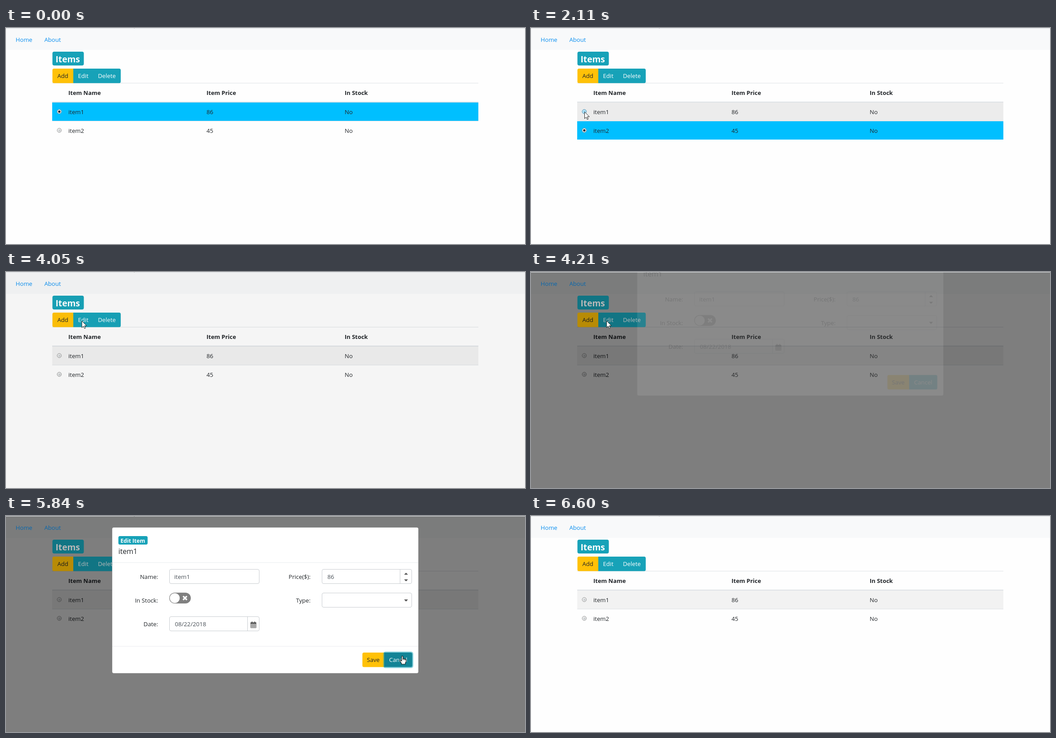
Write an HTML page that moves like this. It is 1157 px wide and 484 px high and loops after 7380 ms.

```html
<!DOCTYPE html>
<html lang="en">
<head>
<meta charset="utf-8">
<title>Items</title>
<style>
  html, body { margin: 0; width: 100%; height: 100%; overflow: hidden; background: #fefefe; }
  svg { display: block; font: 13.15px "Open Sans", "Noto Sans", sans-serif; fill: #212529; }
  .bold { font-weight: 700; }
</style>
</head>
<body>
<svg id="stage" width="1157" height="484" viewBox="0 0 1157 484"></svg>
<script>
const LOOP = 7380;
const TEAL = '#17a2b8', TEAL_HOVER = '#138496', AMBER = '#ffc107', LINE = '#dee2e6', BLUE = '#00bfff';
const stage = document.getElementById('stage');

function add(parent, tag, attrs, text) {
  const el = document.createElementNS('http://www.w3.org/2000/svg', tag);
  set(el, attrs);
  if (text) el.textContent = text;
  parent.append(el);
  return el;
}
function set(el, attrs) {
  for (const key in attrs) el.setAttribute(key, attrs[key]);
}
const group = parent => add(parent, 'g', {});
const rect = (parent, x, y, x2, y2, fill, more) =>
  add(parent, 'rect', { x, y, width: x2 - x, height: y2 - y, fill, ...more });
const label = (parent, x, y, text, more) => add(parent, 'text', { x, y, ...more }, text);
const path = (parent, d, fill, more) => add(parent, 'path', { d, fill, ...more });
const show = (el, on) => set(el, { visibility: on ? 'visible' : 'hidden' });

// A button with chosen round sides
function button(parent, x, y, x2, y2, fill, text, tx, color, left, right) {
  const l = left ? 3.5 : 0, r = right ? 3.5 : 0;
  const box = path(parent, `M${x + l} ${y}H${x2 - r}q${r} 0 ${r} ${r}V${y2 - r}q0 ${r} ${-r} ${r}` +
    `H${x + l}q${-l} 0 ${-l} ${-l}V${y + l}q0 ${-l} ${l} ${-l}z`, fill);
  label(parent, tx, y + 21.3, text, { fill: color });
  return box;
}
const ring = (parent, x, y, x2, y2) => rect(parent, x - 1, y - 1, x2 + 1, y2 + 1, 'none',
  { rx: 4, stroke: TEAL, 'stroke-width': 2.5, 'stroke-opacity': .5 });

// Page
const page = group(stage);
rect(page, 0, 0, 1157, 49, '#f8f9fa');
rect(page, 103, 123, 1053, 124, LINE);
['Item Name', 'Item Price', 'In Stock'].forEach((text, i) =>
  label(page, 139 + 308 * i, 149.7, text, { class: 'bold', 'font-size': 12.95 }));
rect(page, 103, 165, 1053, 167, LINE);

const rows = [['item1', '86', 'No'], ['item2', '45', 'No']].map((cells, i) => {
  const top = 167 + 42 * i, mid = 187.3 + 42 * i;
  const back = rect(page, 103, top, 1053, top + 41, '#fff');
  cells.forEach((text, c) => label(page, 139 + 308 * c, mid + 5.2, text));
  const radio = add(page, 'circle', { cx: 118.8, cy: mid, r: 4.7, 'stroke-width': 1 });
  const shade = add(page, 'circle', { cx: 119.2, cy: mid + .4, r: 2.7 });
  const dot = add(page, 'circle', { cx: 118.8, cy: mid, r: 2.6, fill: '#26343f' });
  return { back, radio, shade, dot, top, mid };
});
rect(page, 103, 208, 1053, 209, LINE);

const backdrop = rect(stage, 0, 0, 1157, 484, '#000');

// Coloured controls dim less than the page
const accents = group(stage);
label(accents, 21.5, 31, 'Home', { fill: '#0a8ff0' });
label(accents, 85.5, 31, 'About', { fill: '#0a8ff0' });
rect(accents, 103.5, 53, 173.5, 84, TEAL, { rx: 4 });
label(accents, 110.5, 76.7, 'Items', { class: 'bold', 'font-size': 19.2, fill: '#fff' });
button(accents, 103.5, 91, 150, 123.5, AMBER, 'Add', 114.5, '#212529', true, false);
const editBox = button(accents, 150, 91, 195, 123.5, TEAL, 'Edit', 160.5, '#fff', false, false);
button(accents, 195, 91, 255.8, 123.5, TEAL, 'Delete', 205, '#fff', false, true);
const editRing = ring(accents, 150, 91, 195, 123.5);

rect(stage, 0, 0, 1157, 1, '#dcdfe2');
rect(stage, 285, 0, 287, 1, '#b5b8bb');

// Dialog
const modal = group(stage);
rect(modal, 236.5, 25.5, 919.5, 352.5, '#fff', { rx: 4, stroke: '#000', 'stroke-opacity': .2 });
rect(modal, 250.5, 45, 315.7, 64, TEAL, { rx: 3.5 });
label(modal, 255.3, 59.6, 'Edit Item', { class: 'bold', 'font-size': 12.1, fill: '#fff' });
label(modal, 250.5, 85.3, 'item1', { 'font-size': 15.9 });
rect(modal, 237, 104, 919, 105, '#e9ecef');
rect(modal, 237, 291.5, 919, 292.5, '#e9ecef');

[['Name:', 339, 141], ['In Stock:', 339, 194], ['Date:', 339, 247], ['Price($):', 679, 141], ['Type:', 679, 194]]
  .forEach(([text, x, y]) => label(modal, x, y, text, { 'text-anchor': 'end' }));

const field = (x, y, text, tx) => {
  rect(modal, x + .5, y + .5, x + 200.5, y + 32.5, '#fff', { rx: 3.5, stroke: '#c8ccd0' });
  label(modal, tx, y + 22, text, { fill: '#495057' });
};
field(364, 119, 'item1', 375);
field(704, 119, '86', 716.5);
field(704, 172, '', 0);
field(364, 225, '08/22/2018', 376.5);
rect(modal, 878, 120, 879, 152, '#c8ccd0');
rect(modal, 538, 226, 539, 258, '#c8ccd0');
path(modal, 'M887.5 131.5h8.6l-4.3 -4.5zM887.5 142h8.6l-4.3 4.5zM887.5 187h8.6l-4.3 4.7z', '#555');

rect(modal, 364, 171.8, 412, 196, '#808080', { rx: 12.1 });
add(modal, 'circle', { cx: 376.2, cy: 183.9, r: 11, fill: '#fff' });
path(modal, 'M394.8 179.6l8.4 8.4m0 -8.4l-8.4 8.4', 'none', { stroke: '#fff', 'stroke-width': 3.4 });
path(modal, 'M545.5 239h12v11.5h-12zM545.5 242h12m-12 2.8h12m-12 2.8h12M548.5 242v8.5m3 -8.5v8.5m3 -8.5v8.5',
  'none', { stroke: '#555', 'stroke-width': .9 });
path(modal, 'M545 238.5h13v3h-13zM547.5 236.5h2v3h-2zM553.5 236.5h2v3h-2z', '#555');

button(modal, 794.5, 306, 843, 338.5, AMBER, 'Save', 804.5, '#212529', true, false);
const cancelBox = button(modal, 843, 306, 905.8, 338.5, TEAL, 'Cancel', 854, '#fff', false, true);
const cancelRing = ring(modal, 843, 306, 905.8, 338.5);

// Pointers, hot spot at 0,0
const arrow = path(stage, 'M0 0V15L3.5 11.8L6 17L8.2 16L5.8 10.9H10.7z', '#fff', { stroke: '#222', 'stroke-width': 1 });
const hand = group(stage);
path(hand, 'M-1.5 1.2Q0 -.8 1.5 1.2V6.3Q3 5.3 4 6.8Q5.4 6 6.3 7.6Q8.5 7 8.5 9.5V12.5L6.7 16V18.5H-2V16.3' +
  'L-5.8 10.5Q-5.5 8.5 -3.6 9.5L-1.5 11.4z', '#fff', { stroke: '#111', 'stroke-width': 1.1 });
path(hand, 'M1.5 6.3V9.5M4 6.8V9.5M6.3 7.6V10', 'none', { stroke: '#111', 'stroke-width': .9 });

// Pointer route: time, x, y
const route = [
  [150, 330, 461], [400, 235, 290], [600, 165, 145], [850, 124, 185], [1090, 119.5, 228],
  [1620, 119.5, 228], [2110, 119.5, 188], [2880, 119.5, 188], [3200, 148, 150], [3520, 171, 110.5],
  [3960, 171, 110.5], [4080, 168.5, 109.5], [4460, 168.5, 109.5], [4890, 237, 164.5],
  [5050, 560, 245], [5210, 868, 311], [5290, 883.5, 313.5], [6080, 883.5, 313.5],
  [6440, 962, 432], [6520, 992, 462], [6600, 1010, 484]
];
const clamp = v => Math.min(1, Math.max(0, v));

function pointer(t) {
  const i = route.findIndex(k => k[0] > t);
  if (i < 1) return route[i < 0 ? route.length - 1 : 0].slice(1);
  const [a, b] = [route[i - 1], route[i]], p = (t - a[0]) / (b[0] - a[0]);
  return [a[1] + (b[1] - a[1]) * p, a[2] + (b[2] - a[2]) * p];
}

// cubic-bezier(0, 0, .58, 1)
function easeOut(x) {
  let lo = 0, hi = 1;
  for (let i = 0; i < 20; i++) {
    const s = (lo + hi) / 2;
    if (1.74 * s * s * (1 - s) + s ** 3 < x) lo = s; else hi = s;
  }
  return 3 * lo * lo * (1 - lo) + lo ** 3;
}

const OPEN = 4040, SLIDE = 4197, CLOSE = 5885;

function draw(t) {
  const [x, y] = pointer(t);
  const visible = t >= 150 && t < 6590;
  const selected = t < 1250 ? 0 : t < 2960 ? 1 : t < OPEN ? 0 : -1;
  const checked = t < 1170 ? 0 : t < 2810 ? 1 : t < OPEN ? 0 : -1;

  rows.forEach((row, i) => {
    const over = visible && t < OPEN && y >= row.top && y < row.top + 41;
    const near = over && Math.hypot(x - 118.8, y - row.mid) < 6;
    set(row.back, { fill: i === selected ? BLUE : over ? '#ececec' : i ? '#fefefe' : '#f2f2f2' });
    set(row.radio, { fill: near ? '#c9ecfb' : '#f4f4f4', stroke: near ? '#3c86ae' : '#8e8f8f' });
    set(row.shade, { fill: near ? '#8fd0ee' : '#cfd2d4' });
    show(row.dot, i === checked);
  });

  const fade = Math.min(clamp((t - OPEN) / 150), 1 - clamp((t - CLOSE) / 150));
  set(backdrop, { opacity: fade / 2 });
  accents.style.filter = fade ? `brightness(${1 - .28 * fade})` : 'none';

  const alpha = Math.min(clamp((t - SLIDE) / 150), 1 - clamp((t - CLOSE) / 150));
  const shift = t < CLOSE ? 1 - easeOut(clamp((t - SLIDE) / 300)) : easeOut(clamp((t - CLOSE) / 300));
  set(modal, { opacity: alpha, transform: `translate(0 ${-81.5 * shift})` });

  const onEdit = t > 3200 && t < OPEN && x > 150 && y < 123;
  const onCancel = t > 5190 && t < 6080;
  set(editBox, { fill: onEdit ? TEAL_HOVER : TEAL });
  set(cancelBox, { fill: t > 5250 && t < CLOSE ? TEAL_HOVER : TEAL });
  editRing.style.display = t >= 3750 && t < OPEN ? '' : 'none';
  cancelRing.style.display = t >= 5740 && t < 6040 ? '' : 'none';

  show(hand, visible && (onEdit || onCancel));
  show(arrow, visible && !onEdit && !onCancel);
  for (const el of [hand, arrow]) set(el, { transform: `translate(${x} ${y})` });
}

const start = performance.now();
function tick() {
  draw((performance.now() - start) % LOOP);
  requestAnimationFrame(tick);
}
tick();
</script>
</body>
</html>
```
